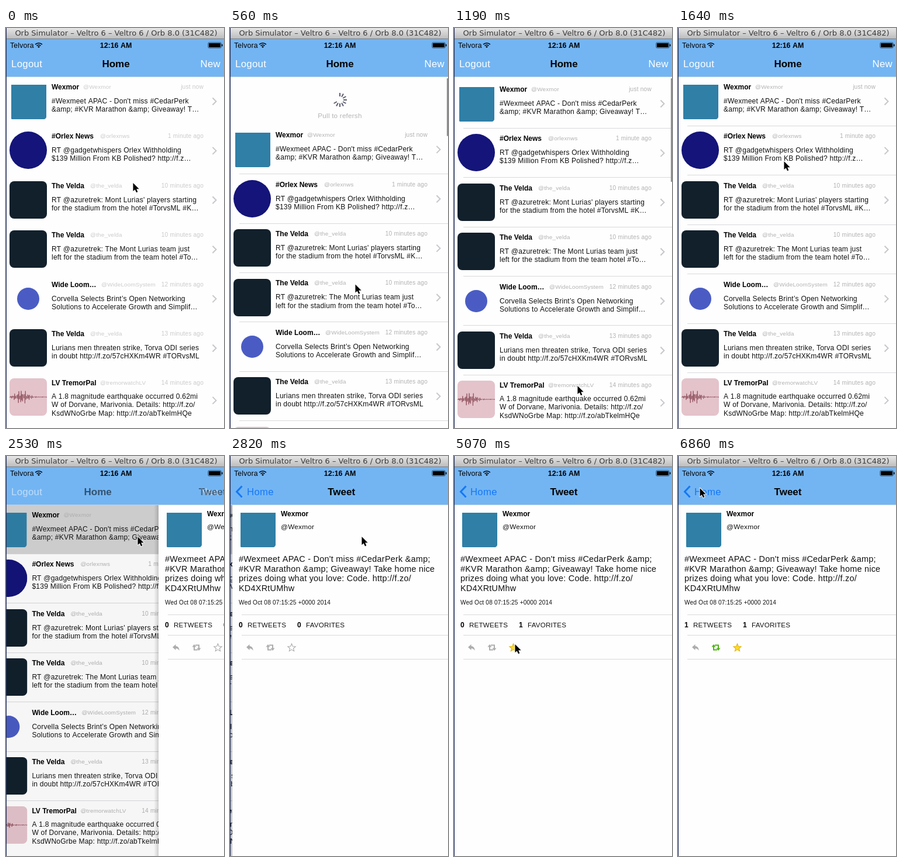
Recreate the animation shown at these times as an HTML page with a canvas. Size 373x684 px, loop 8 s.

```html
<!DOCTYPE html>
<html lang="en">
<head>
<meta charset="utf-8">
<title>Timeline demo</title>
<style>
  html, body { margin: 0; width: 100%; height: 100%; overflow: hidden; background: #fefefe; }
  canvas { display: block; width: 373px; height: 684px; }
</style>
</head>
<body>
<canvas id="stage"></canvas>
<script>
const W = 373, H = 684, LOOP = 8000, TICK = 149;
const TOP = 83, ROW = 84.4;
const SANS = '"Liberation Sans", Arial, sans-serif';
const BLUE = '#73b5f3', PAPER = '#fefefe', LINE = '#d9d9dc', ICON = '#adadad';

const canvas = document.getElementById('stage');
const c = canvas.getContext('2d');
const dpr = window.devicePixelRatio || 1;
canvas.width = W * dpr;
canvas.height = H * dpr;

const velda = { name: 'The Velda', handle: '@the_velda', hx: 144, face: 'dark' };
const rows = [
  { name: 'Wexmor', handle: '@Wexmor', hx: 132, face: 'square', ago: 'just now',
    text: ["#Wexmeet APAC - Don't miss #CedarPerk", '&amp; #KVR Marathon &amp; Giveaway! T…'] },
  { name: '#Orlex News', handle: '@orlexnws', hx: 161, face: 'disc', ago: '1 minute ago',
    text: ['RT @gadgetwhispers Orlex Withholding', '$139 Million From KB Polished? http://f.z…'] },
  { ...velda, ago: '10 minutes ago',
    text: ["RT @azuretrek: Mont Lurias' players starting", 'for the stadium from the hotel #TorvsML #K…'] },
  { ...velda, ago: '10 minutes ago',
    text: ['RT @azuretrek: The Mont Lurias team just', 'left for the stadium from the team hotel #To…'] },
  { name: 'Wide Loom…', handle: '@WideLoomSystem', hx: 163, face: 'blot', ago: '12 minutes ago',
    text: ['Corvella Selects Brint’s Open Networking', 'Solutions to Accelerate Growth and Simplif…'] },
  { ...velda, ago: '13 minutes ago',
    text: ['Lurians men threaten strike, Torva ODI series', 'in doubt http://f.zo/57cHXKm4WR #TORvsML'] },
  { name: 'LV TremorPal', handle: '@tremorwatchLV', hx: 161, face: 'quake', ago: '14 minutes ago',
    text: ['A 1.8 magnitude earthquake occurred 0.62mi', 'W of Dorvane, Marivonia. Details: http://f.zo/',
           'KsdWNoGrbe Map: http://f.zo/abTkelmHQe'] }
];
const post = ["#Wexmeet APAC - Don't miss #CedarPerk &amp;", '#KVR Marathon &amp; Giveaway! Take home nice',
  'prizes doing what you love: Code. http://f.zo/', 'KD4XRtUMhw'];

// Keys are [tick, value, ...]
const pointer = [[1, 217, 265], [5, 211, 612], [8, 211, 612], [11, 181, 228], [14, 225, 138], [19, 225, 138],
  [23, 199, 325], [26, 104, 322], [35, 104, 322], [38, 66, 324], [40, 66, 324], [42, 78, 215], [46, 37, 55]];
const slide = [[16, 1], [17, .7], [18, .12], [19, .011], [20, 0]];

const clamp = v => Math.max(0, Math.min(1, v));

function at(keys, k) {
  const i = keys.findIndex(key => key[0] >= k);
  if (i < 0) return keys[keys.length - 1].slice(1);
  if (i === 0) return keys[0].slice(1);
  const a = keys[i - 1], b = keys[i], u = (k - a[0]) / (b[0] - a[0]);
  return a.slice(1).map((v, n) => v + (b[n + 1] - v) * u);
}

function txt(s, x, y, size, color = '#111', { bold = false, align = 'left', font = SANS } = {}) {
  c.font = `${bold ? 'bold ' : ''}${size}px ${font}`;
  c.letterSpacing = !bold && font === SANS ? `${size * .018}px` : '0px';
  c.textAlign = align;
  c.fillStyle = color;
  c.fillText(s, x, y);
}

function box(x, y, w, h, color) {
  c.fillStyle = color;
  c.fillRect(x, y, w, h);
}

function disc(x, y, r, color) {
  c.fillStyle = color;
  c.beginPath();
  c.arc(x, y, r, 0, 7);
  c.fill();
}

function poly(points, close = true) {
  c.beginPath();
  points.forEach(([x, y]) => c.lineTo(x, y));
  if (close) c.closePath();
}

function fade(alpha, draw) {
  c.save();
  c.globalAlpha *= clamp(alpha);
  draw();
  c.restore();
}

function chevron(x, y, dx, dy, width, color) {
  poly([[x, y - dy], [x + dx, y], [x, y + dy]], false);
  c.lineWidth = width;
  c.strokeStyle = color;
  c.stroke();
}

function drawQuake() {
  box(0, 0, 64, 64, '#e4c3cb');
  c.beginPath();
  for (let x = 0; x <= 64; x += .8) {
    const swell = 1 + 13 * Math.exp(-(((x - 21) / 13) ** 2));
    c.lineTo(x, 32 + swell * Math.sin(x * 3.4) * (.65 + .35 * Math.sin(x * 1.7)));
  }
  c.lineWidth = .8;
  c.strokeStyle = '#8a4a55';
  c.stroke();
}

function avatar(face, x, y) {
  c.save();
  c.translate(x, y);
  c.beginPath();
  c.roundRect(0, 0, 64, 64, 8);
  c.clip();
  if (face === 'square') box(3, 4, 60, 59, '#2f7fa6');
  if (face === 'disc') disc(32, 32, 32, '#14147a');
  if (face === 'dark') box(0, 0, 64, 64, '#12202c');
  if (face === 'blot') disc(32, 32, 19, '#4a5cc4');
  if (face === 'quake') drawQuake();
  c.restore();
}

function drawRow(row, i, y, k) {
  const gray = k < 2 ? '#cbcbcb' : '#b2b2b2';
  const tall = row.text.length > 2;
  if (i === 0 && k >= 16) box(0, y, W, ROW, '#d3d3d3');
  if (i > 0 && k >= 2) box(16, Math.floor(y), W + 120, 1, LINE);
  avatar(row.face, 6, Math.round(y + 10));
  const base = Math.floor(y + 22.45);
  txt(row.name, 78, base, 12, '#000', { bold: true });
  txt(row.handle, row.hx, base - 1, 9.9, gray);
  txt(row.ago, 338, base - 1, 10.2, gray, { align: 'right' });
  const first = y + (tall ? 45.45 : 46.45);
  row.text.forEach((s, n) => txt(s, 78, Math.floor(first + n * 14.1), 12.05));
  chevron(353.5, y + (tall ? 47.5 : 42.5), 6, 6, 2, '#c7c7cc');
}

function pull(k) {
  if (k < 2 || k > 9) return 0;
  if (k > 5) return 41.4 * .31 ** (k - 6);
  const h = H - TOP, drag = at(pointer, k)[1] - 265;
  return h * (1 - 1 / (1 + drag * .55 / h));
}

function drawRefresh(off) {
  const ticks = Math.min(12, Math.floor((off - 28) / 6));
  c.lineWidth = 2;
  c.strokeStyle = '#5c5c70';
  for (let i = 0; i < ticks; i++) {
    const a = i * Math.PI / 6, sx = Math.sin(a), sy = -Math.cos(a);
    poly([[188 + 6 * sx, 123 + 6 * sy], [188 + 12 * sx, 123 + 12 * sy]], false);
    c.stroke();
  }
  fade(off / 41, () => txt('Pull to refersh', 188, 154, 11.7, '#b4b4b4', { align: 'center' }));
}

function drawList(k, p) {
  const off = pull(k);
  c.save();
  c.translate(-112 * p, 0);
  rows.forEach((row, i) => drawRow(row, i, TOP + off + i * ROW, k));
  if (off > 0) drawRefresh(off);
  c.restore();
  if (k >= 2 && k <= 10) {
    fade(k === 10 ? .5 : 1, () => box(371, 86, 2, Math.max(36, 181 - off), '#8e8e94'));
  }
  if (p > 0) box(0, TOP, W, H - TOP, `rgba(0,0,0,${.1 * p})`);
}

function drawReply() {
  c.fillStyle = ICON;
  c.beginPath();
  c.moveTo(24, 327);
  c.lineTo(29.5, 322);
  c.lineTo(29.5, 325);
  c.quadraticCurveTo(35.5, 325.5, 35.5, 333);
  c.quadraticCurveTo(33.5, 329, 29.5, 329);
  c.lineTo(29.5, 332);
  c.fill();
}

function drawRepost(color) {
  c.fillStyle = c.strokeStyle = color;
  c.lineWidth = 2;
  for (const turn of [0, Math.PI]) {
    c.save();
    c.translate(65, 327.5);
    c.rotate(turn);
    poly([[-4, -2], [-4, 4], [2, 4]], false);
    c.stroke();
    poly([[-7.5, -1], [-4, -5.5], [-.5, -1]]);
    c.fill();
    c.restore();
  }
}

function drawStar(on) {
  const pts = Array.from({ length: 10 }, (_, i) => {
    const a = i * Math.PI / 5, r = i % 2 ? 3.1 : 7;
    return [101.5 + r * Math.sin(a), 328 - r * Math.cos(a)];
  });
  poly(pts);
  c.lineWidth = 1.1;
  c.strokeStyle = on ? '#e2b51c' : ICON;
  if (on) {
    c.fillStyle = '#fbdc22';
    c.fill();
  }
  c.stroke();
}

function drawDetail(k, x) {
  c.save();
  c.translate(x, 0);
  if (x > 0) {
    const shade = c.createLinearGradient(-8, 0, 0, 0);
    shade.addColorStop(0, 'rgba(0,0,0,0)');
    shade.addColorStop(1, 'rgba(0,0,0,.16)');
    box(-8, TOP, 8, H, shade);
  }
  box(0, TOP, W, H, PAPER);
  avatar('square', 11, 93);
  txt(rows[0].name, 83, 103, 12, '#000', { bold: true });
  txt(rows[0].handle, 83, 125, 11.8);
  post.forEach((s, n) => txt(s, 11, Math.round(181 + n * 16.7), 14.4));
  txt('Wed Oct 08 07:15:25 +0000 2014', 11, 254, 10.1);
  [271, 306, 347].forEach(y => box(16, y, W, 1, LINE));
  const shared = k >= 40, liked = k >= 34;
  txt(+shared, 11, 293, 12, '#000', { bold: true });
  txt('RETWEETS', 26, 293, 11.6);
  txt(+liked, 111, 293, 12, '#000', { bold: true });
  txt('FAVORITES', 126, 293, 11.6);
  drawReply();
  drawRepost(shared ? '#4fb313' : ICON);
  drawStar(liked);
  c.restore();
}

function drawStatus() {
  txt('Telvora', 7, 34, 12.2, '#000');
  c.strokeStyle = '#000';
  c.lineWidth = 1.6;
  for (const r of [5, 8.3]) {
    c.beginPath();
    c.arc(56, 34, r, -Math.PI * .75, -Math.PI * .25);
    c.stroke();
  }
  c.fillStyle = '#000';
  c.beginPath();
  c.moveTo(56, 34);
  c.arc(56, 34, 2.8, -Math.PI * .75, -Math.PI * .25);
  c.fill();
  txt('12:16 AM', 188, 34, 12.4, '#000', { bold: true, align: 'center' });
  c.lineWidth = .6;
  c.beginPath();
  c.roundRect(345.8, 24.8, 22.4, 9.4, 2);
  c.stroke();
  c.beginPath();
  c.roundRect(347, 26, 20, 7, 1);
  c.roundRect(369, 27.5, 1.5, 4, .7);
  c.fill();
}

function drawNav(p) {
  const r = 1 - p, mid = { bold: true, align: 'center' };
  box(0, 19, W, TOP - 19, BLUE);
  box(0, TOP, W, 1, '#bcd0e2');
  drawStatus();
  fade(1 - p * 1.5, () => {
    txt('Logout', 9, 67, 16.8, '#fff');
    txt('New', 367, 67, 16.8, '#fff', { align: 'right' });
    txt('Home', 188 - 103 * p, 67, 17, '#000', mid);
  });
  if (p === 0) return;
  fade(p * 1.6, () => txt('Tweet', 188 + 236 * r, 67, 17, '#000', mid));
  fade((p - .3) / .6, () => {
    chevron(20.5, 61, -9, 9.5, 3, '#1477f8');
    txt('Home', 28 + 100 * r, 67, 16.7, '#1477f8');
  });
}

function drawTitleBar() {
  const metal = c.createLinearGradient(0, 0, 0, 18);
  metal.addColorStop(0, '#e6e6e6');
  metal.addColorStop(1, '#bdbdbd');
  box(0, 0, W, 18, metal);
  box(0, 18, W, 1, '#75818d');
  txt('Orb Simulator – Veltro 6 – Veltro 6 / Orb 8.0 (31C482)', 188.5, 12.5, 13, '#3a3a3a',
    { align: 'center', font: '"DejaVu Sans", sans-serif' });
}

function drawPointer(x, y) {
  c.save();
  c.translate(x, y);
  c.scale(.93, .93);
  poly([[.5, 0], [.5, 15], [4, 12], [6.5, 17.5], [9, 16.5], [6.7, 11], [11.5, 11]]);
  c.lineJoin = 'round';
  c.lineWidth = 2;
  c.strokeStyle = '#fff';
  c.stroke();
  c.fillStyle = '#000';
  c.fill();
  c.restore();
}

function render(t) {
  // The screen refreshes in coarse ticks.
  const k = t < 270 ? 0 : Math.max(2, Math.floor((t + 12) / TICK));
  const [r] = at(slide, k);
  const p = 1 - r;
  c.setTransform(dpr, 0, 0, dpr, 0, 0);
  box(0, 0, W, H, PAPER);
  if (r > 0) drawList(k, p);
  if (p > 0) drawDetail(k, Math.round(W * r));
  drawNav(p);
  drawTitleBar();
  box(0, 0, 1, H, '#1c2850');
  drawPointer(...at(pointer, k));
}

function loop(now) {
  render(now % LOOP);
  requestAnimationFrame(loop);
}
requestAnimationFrame(loop);
</script>
</body>
</html>
```
